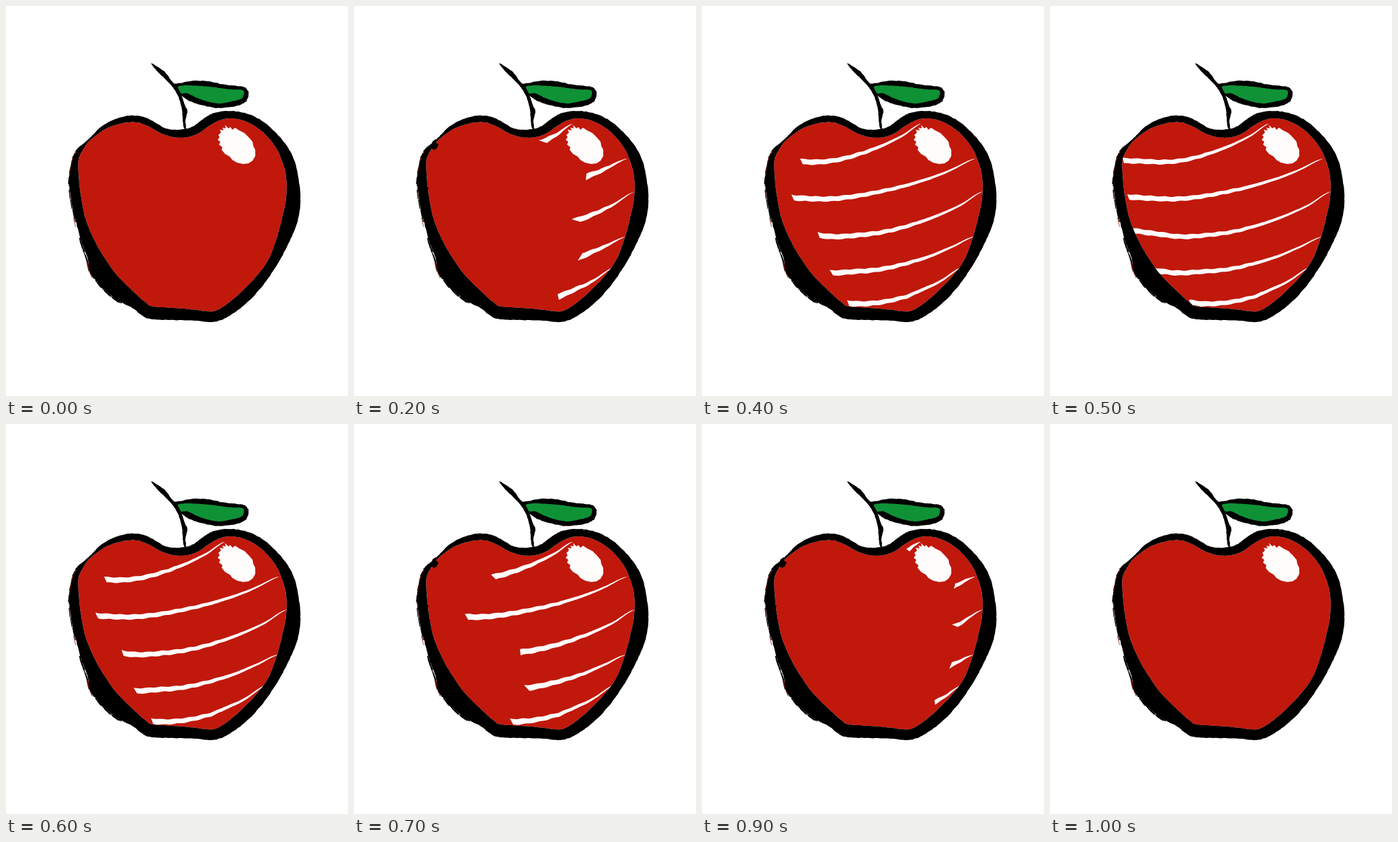
An HTML page that plays this animation: 509 by 580 pixels, repeating every 1.1 s.

```html
<!DOCTYPE html>
<html lang="en">
<head>
<meta charset="utf-8">
<title>Apple</title>
<style>
  html, body { margin: 0; width: 100%; height: 100%; overflow: hidden; background: #fff; }
  svg { display: block; width: 100vw; height: 100vh; }
</style>
</head>
<body>
<svg id="stage" viewBox="0 0 509 580">
  <path id="flesh" fill="#c1180c"/>
  <path id="stripes" fill="#fefdfc"/>
  <path id="shine" fill="#fefdfc"/>
  <path id="skin" fill-rule="evenodd"/>
  <path id="bristles" fill="none" stroke="#000" stroke-width="1.3"/>
  <path id="flecks" fill="none" stroke="#a3160c" stroke-width=".8"/>
  <path id="nubs" d="M117 201L122 198L122 203L126 206L123 212L119 214L114 211Z M105 266L108 269L111 270L110 273L106 274Z"/>
  <path id="leafEdge"/>
  <path id="leaf" fill="#0f9136"/>
  <path id="stem"/>
</svg>
<script>
const $ = id => document.getElementById(id);
const parse = text => text.trim().split(/\s+/).map(p => p.split(',').map(Number));

let seed = 17;
const rand = () => (seed = (seed * 16807) % 2147483647) / 2147483647;
const jitter = a => (rand() * 2 - 1) * a;

const mix = (a, b, c, d, t) =>
  b + t * ((c - a) / 2 + t * (a - 2.5 * b + 2 * c - d / 2 + t * (1.5 * (b - c) + (d - a) / 2)));

// Points along a closed smooth curve, optionally roughened.
function closedCurve(pts, rough = 0) {
  const n = pts.length, out = [];
  for (let i = 0; i < n; i++) {
    const q = [-1, 0, 1, 2].map(k => pts[(i + k + n) % n]);
    for (let t = 0; t < 1; t += 0.125) {
      out.push([0, 1].map(k => mix(q[0][k], q[1][k], q[2][k], q[3][k], t) + jitter(rough)));
    }
  }
  return out;
}
const toPath = pts => 'M' + pts.map(p => p[0].toFixed(1) + ' ' + p[1].toFixed(1)).join('L') + 'Z';

const outer = closedCurve(parse(`125,196 140,181 160,169 185,163 205,165 220,172 235,181 250,184
  267,183 280,178 295,167 310,159 330,156 355,159 380,170 400,187 418,208 430,232 436,260 438,290
  434,320 422,350 405,382 385,412 362,438 340,456 320,467 303,470 280,468 250,467 218,466 205,462
  188,449 165,437 145,420 127,397 121,374 112,350 104,320 97,290 94,260 97,238 104,216 116,204`), 0.35);
const inner = toPath(closedCurve(parse(`127,198 150,182 175,174 195,173 212,179 232,190 250,195 270,195
  287,189 303,178 318,170 335,167 355,171 378,184 398,205 410,228 417,255 417,285 411,315 403,345
  390,378 370,405 345,430 325,446 312,453 300,454 265,450 220,447 208,441 190,425 165,400 145,372
  130,345 118,315 111,280 108,250 108,228 117,210`), 0.2));
$('flesh').setAttribute('d', inner);
$('skin').setAttribute('d', toPath(outer) + inner);

$('leafEdge').setAttribute('d', toPath(closedCurve(parse(`249,118 262,114 280,111 300,112 325,117
  345,119 357,122 361,131 357,142 345,148 318,152 295,148 275,142 262,134`), 0.5)));
$('leaf').setAttribute('d', toPath(closedCurve(parse(`256,120 270,118 290,119 310,121 335,124 352,125
  354,131 350,138 335,142 318,145 300,142 285,137 270,130 258,130`), 0.2)));
$('stem').setAttribute('d', toPath(closedCurve(parse(`216,85 235,97 247,112 256,122 262,135 267,149
  270,157 267,170 268,182 265,182 263,170 262,155 259,142 254,130 245,117 235,107 225,97`), 0.3)));
$('shine').setAttribute('d', toPath(parse(`326,177 331,182 334,180 337,184 341,181 347,185 355,189
  362,196 367,202 368,208 371,214 371,223 367,230 361,234 353,235 344,233 337,229 333,224 326,220
  321,214 322,210 317,206 319,202 315,199 318,195 316,192 320,188 318,184 324,185 322,181 327,182`)));

// Dry-brush hairs following the left side.
function hairs(count, from, to, offset) {
  let d = '';
  for (let k = 0; k < count; k++) {
    const i = Math.floor(outer.length * (from + rand() * (to - from)));
    const a = outer[i], b = outer[Math.min(i + 6, outer.length - 1)];
    const x = a[0] - rand() * offset, y = a[1] + rand() * offset;
    d += `M${x} ${y}L${x + (b[0] - a[0]) * .6} ${y + (b[1] - a[1]) * .6}`;
  }
  return d;
}
$('bristles').setAttribute('d', hairs(34, .74, .84, 1.8) + hairs(20, .86, .98, 1.5));
$('flecks').setAttribute('d', hairs(8, .78, .97, 2.5));

// Centre lines, right tip first.
const lines = [
  '326,175 300,192 270,207 235,220 200,229 170,232 140,231 108,230',
  '407,227 370,244 340,256 300,268 260,277 220,284 185,287 150,286 115,284',
  '418,276 385,296 350,312 310,326 270,336 230,341 195,343 160,339 120,334',
  '405,343 375,357 340,372 300,384 262,392 225,395 190,397 150,393',
  '388,388 355,409 330,421 305,432 270,440 235,443 207,441'
].map(parse);

// Left ends [upper x, lower x] of every stripe, per stage of growth.
const ends = [
  [],
  [[304, 309], [377, 375], [372, 380], [372, 368], [346, 347]],
  [[275, 287], [346, 345], [324, 337], [340, 333], [303, 305]],
  [[204, 211], [165, 170], [247, 248], [253, 261], [232, 237]],
  [[146, 150], [133, 137], [172, 175], [190, 195], [216, 219]],
  [[108, 110], [115, 118], [121, 123], [150, 155], [207, 209]]
];
const halfWidth = [0, 3.6, 4.6, 4.4, 4.1, 4];
const taper = [1, .9, .85, .6, .5, .5];

function yAt(line, x) {
  let i = 0;
  while (i < line.length - 2 && x < line[i + 1][0]) i++;
  const p = k => line[Math.max(0, Math.min(line.length - 1, k))][1];
  const t = (line[i][0] - x) / (line[i][0] - line[i + 1][0]);
  return mix(p(i - 1), p(i), p(i + 1), p(i + 2), t);
}

function stripe(line, [top, bottom], stage) {
  const tip = line[0][0];
  const edge = (end, side) => {
    const pts = [];
    const steps = Math.ceil((tip - end) / 4);
    for (let k = 0; k <= steps; k++) {
      const t = k / steps, x = tip + (end - tip) * t;
      const wave = t > .4 ? Math.sin(x * .31 + side) * .5 : 0;
      pts.push([x, yAt(line, x) + side * (halfWidth[stage] * t ** taper[stage] + wave)]);
    }
    return pts;
  };
  return toPath([...edge(top, -1), ...edge(bottom, 1).reverse()]);
}
const stages = ends.map((cuts, s) => cuts.map((cut, i) => stripe(lines[i], cut, s)).join(''));

const start = performance.now();
let shown = -1;
function draw() {
  const tick = Math.floor((performance.now() - start) % 1100 / 100);
  const stage = 5 - Math.abs(tick - 5);
  if (stage !== shown) {
    shown = stage;
    $('stripes').setAttribute('d', stages[stage]);
    $('nubs').style.visibility = stage > 0 && stage < 4 ? 'visible' : 'hidden';
  }
  requestAnimationFrame(draw);
}
draw();
</script>
</body>
</html>
```
